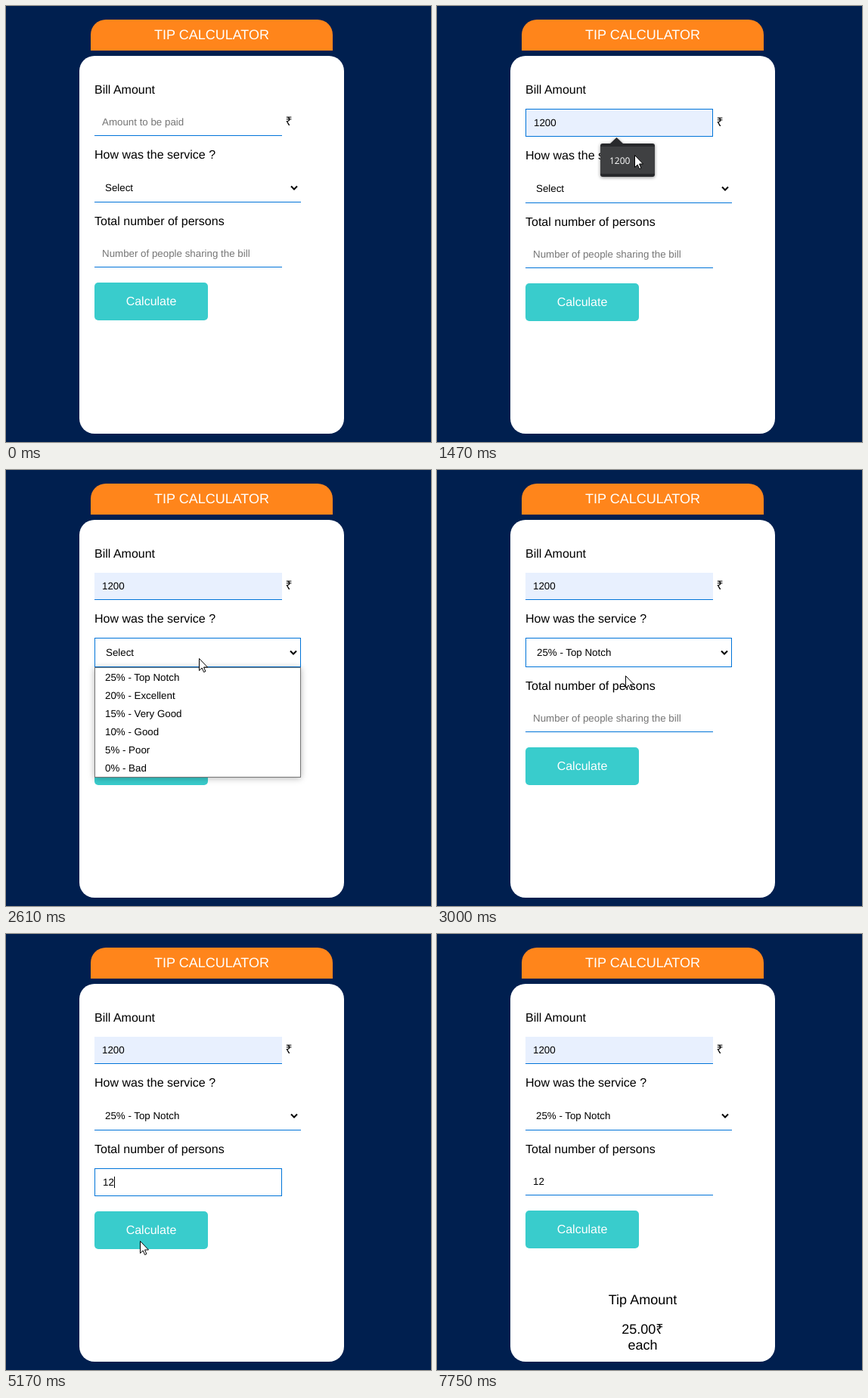
An HTML page that plays this animation: 562 by 577 pixels, repeating every 8.02 s.

```html
<!DOCTYPE html>
<html lang="en">
<head>
<meta charset="utf-8">
<title>Tip Calculator</title>
<style>
  html, body { margin: 0; width: 100%; height: 100%; overflow: hidden; background: #001f4f; }
  svg { display: block; font: 16px "Liberation Sans", Arial, sans-serif; text-rendering: geometricPrecision; }
  .big { font-size: 18px; }
  .small { font-size: 13.333px; }
  .mid { text-anchor: middle; }
  .hint { fill: #757575; }
  .line { fill: #0074d9; }
  .frame { fill: none; stroke: #0074d9; visibility: hidden; }
  .chevron { fill: none; stroke: #000; stroke-width: 2; }
  .below { transform: translate(0, 1px); }
  .focus .frame { visibility: visible; }
  .focus .line { visibility: hidden; }
  .focus .content { transform: translate(1px, 1px); }
  .focus .chevron { transform: translate(-1px, 1px); }
  .focus .unit { transform: translate(0, 1px); }
  .off { display: none; }
  #menu { filter: drop-shadow(0 1px 4px rgba(0, 0, 0, .3)); }
  #tooltip { filter: drop-shadow(0 1px 2px rgba(0, 0, 0, .45)); }
  #tooltip text { font: 12px "Open Sans", sans-serif; fill: #fff; }
</style>
</head>
<body>
<svg width="562" height="577" viewBox="0 0 562 577">
  <rect width="562" height="577" fill="#001f4f"/>
  <path d="M112 59V38a20 20 0 0 1 20-20H412a20 20 0 0 1 20 20V59Z" fill="#ff851b"/>
  <text class="big mid" x="272" y="44" fill="#fff">TIP CALCULATOR</text>
  <rect x="97" y="66" width="350" height="500" rx="20" fill="#fff"/>

  <text x="117" y="116">Bill Amount</text>
  <g data-row="bill">
    <rect id="autofill" x="117" y="136" width="248" height="36" fill="#e8f0fe"/>
    <rect class="line" x="117" y="171" width="248" height="1"/>
    <rect class="frame" x="117.5" y="136.5" width="247" height="36"/>
    <g class="content small">
      <text id="billHint" class="hint" x="127" y="158">Amount to be paid</text>
      <text id="billText" x="127" y="158">1200</text>
    </g>
    <text class="unit" x="369.5" y="158">₹</text>
  </g>

  <g data-row="service">
    <text x="117" y="202">How was the service ?</text>
    <rect class="line" x="117" y="259" width="273" height="1"/>
    <rect class="frame" x="117.5" y="222.5" width="272" height="38"/>
    <g class="content small"><text id="choice" x="131" y="245"></text></g>
    <path class="chevron" d="M377 238.5l4 4 4-4"/>
  </g>

  <g data-row="people">
    <text x="117" y="290">Total number of persons</text>
    <rect class="line" x="117" y="345" width="248" height="1"/>
    <rect class="frame" x="117.5" y="310.5" width="247" height="36"/>
    <g class="content small">
      <text id="peopleHint" class="hint" x="127" y="332">Number of people sharing the bill</text>
      <text id="peopleText" x="127" y="332"></text>
    </g>
  </g>

  <g data-row="button">
    <rect x="117" y="366" width="150" height="50" rx="5" fill="#39cccc"/>
    <text class="mid" x="192" y="396" fill="#fff">Calculate</text>
  </g>

  <g id="result" class="big mid">
    <text x="272" y="490">Tip Amount</text>
    <text x="272" y="529">25.00₹</text>
    <text x="272" y="550">each</text>
  </g>

  <rect id="caret" width="1" height="15"/>

  <g id="tooltip">
    <path d="M228 183L237.500 174 247 183Z" fill="#28292c"/>
    <rect x="216" y="182" width="72" height="44" rx="3" fill="#28292c"/>
    <rect x="216" y="186" width="72" height="36" fill="#3f4042"/>
    <text x="228" y="209">1200</text>
  </g>

  <g id="menu" class="small">
    <rect x="117.5" y="261.5" width="272" height="145" fill="#fff" stroke="#767676"/>
    <rect id="hover" x="118" y="262" width="271" height="24" fill="#1e90ff"/>
  </g>

  <path id="arrow" d="M.5.5V16.500L4.200 13 6.600 18.500 8.900 17.500 6.500 12H11.500Z" fill="#fff" stroke="#000"/>
  <path id="beam" d="M-3-8.500H3M0-8.500V8.500M-3 8.500H3" fill="none" stroke="#000"/>
</svg>
<script>
const LOOP = 8020;
const STEP = 67; // the pointer advances in visible steps
const BLINK = 530;
const OPTIONS = ['25% - Top Notch', '20% - Excellent', '15% - Very Good', '10% - Good', '5% - Poor', '0% - Bad'];

const CLICK = { bill: 860, service: 2210, people: 3770, button: 5500 };
const TIP = { opens: 1010, hovered: 1270, picked: 1750 };
const MENU = { opens: 2280, picked: 2940 };
const TYPED = { first: 4570, second: 4840 };
const RESULT = 5560;

// The pointer rests at each stop until the next move begins.
const ENTRY = { x: 555, y: 630 };
const MOVES = [
  { from: 190, to: CLICK.bill, x: 237, y: 154 },
  { from: TIP.opens, to: 1450, x: 261, y: 197 },
  { from: 1880, to: 2100, x: 260, y: 228 },
  { from: 2480, to: 2900, x: 249, y: 272 },
  { from: 3300, to: CLICK.people, x: 228, y: 338 },
  { from: TYPED.second, to: 5150, x: 177, y: 406 },
  { from: 5770, to: 6450, x: 244, y: 533 },
  { from: 6690, to: 7000, x: 367, y: 582 },
  { from: 7220, to: 7750, x: 575, y: 553 }
];

const $ = id => document.getElementById(id);
const rows = [...document.querySelectorAll('[data-row]')];
const show = (id, on) => $(id).classList.toggle('off', !on);
const place = (id, x, y) => $(id).setAttribute('transform', `translate(${Math.round(x)} ${Math.round(y)})`);
const within = (t, start, end) => t >= start && t < end;

const optionTexts = OPTIONS.map((label, i) => {
  const text = document.createElementNS('http://www.w3.org/2000/svg', 'text');
  text.setAttribute('x', 131);
  text.setAttribute('y', 279 + 24 * i);
  text.textContent = label;
  return $('menu').appendChild(text);
});

function pointerAt(t) {
  let { x, y } = ENTRY;
  for (const move of MOVES) {
    if (t < move.from) break;
    const elapsed = (Math.floor((t - move.from) / STEP) + 1) * STEP;
    const eased = Math.sin(Math.min(1, elapsed / (move.to - move.from)) * Math.PI / 2);
    x += (move.x - x) * eased;
    y += (move.y - y) * eased;
  }
  return { x, y };
}

function drawCaret(t, focus, people) {
  const inBill = focus === 'bill' && (t < CLICK.bill + BLINK || t >= TIP.picked);
  const inPeople = focus === 'people' && (t < CLICK.people + BLINK || people !== '');
  show('caret', inBill || inPeople);
  if (inBill) place('caret', t < TIP.picked ? 128 : 157, 147);
  if (inPeople) place('caret', 128 + 7.4 * people.length, 321);
}

function drawPointer({ x, y }, tooltip) {
  const overField = within(x, 117, 365) &&
    (within(y, 136, tooltip ? 174 : 173) || within(y, 310, 347));
  show('arrow', !overField);
  show('beam', overField);
  place(overField ? 'beam' : 'arrow', x, y);
}

function render(t) {
  const focus = Object.keys(CLICK).filter(name => CLICK[name] <= t).pop();
  const focusIndex = rows.findIndex(row => row.dataset.row === focus);
  const pointer = pointerAt(t);
  const filled = t >= TIP.hovered;
  const tooltip = within(t, TIP.opens, TIP.picked);
  const people = '12'.slice(0, (t >= TYPED.first) + (t >= TYPED.second));

  rows.forEach((row, i) => {
    row.classList.toggle('focus', i === focusIndex);
    row.classList.toggle('below', focusIndex >= 0 && i > focusIndex);
  });
  show('autofill', filled);
  show('billText', filled);
  show('billHint', !filled);
  $('choice').textContent = t < MENU.picked ? 'Select' : OPTIONS[0];
  $('peopleText').textContent = people;
  show('peopleHint', !people);
  show('result', t >= RESULT);
  show('tooltip', tooltip);

  const hovering = pointer.y >= 262;
  show('menu', within(t, MENU.opens, MENU.picked));
  show('hover', hovering);
  optionTexts[0].setAttribute('fill', hovering ? '#fff' : '#000');

  drawCaret(t, focus, people);
  drawPointer(pointer, tooltip);
}

const origin = performance.now();
function tick() {
  render((performance.now() - origin) % LOOP);
  requestAnimationFrame(tick);
}
tick();
</script>
</body>
</html>
```
